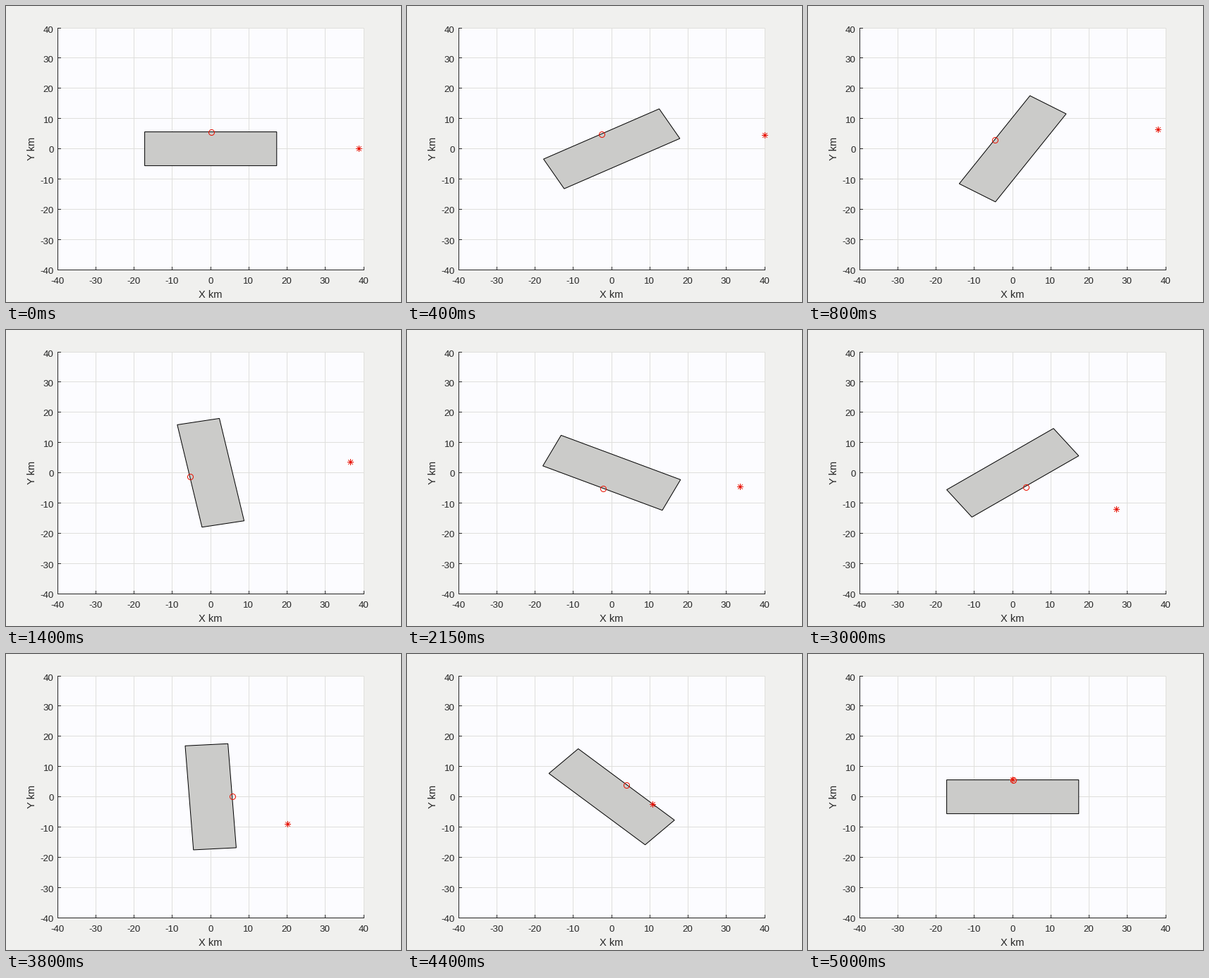
A matplotlib script that plays this animation: 560 px wide and 420 px high, repeating every 5050 ms.

```python
import numpy as np
import matplotlib.pyplot as plt
from matplotlib.animation import FuncAnimation
from matplotlib.patches import Polygon, Rectangle

W, H, DPI = 560, 420, 100
PX = 72 / DPI  # points per pixel
STEPS = 100
INK = "#262626"
RED = "#e81000"
GRID = "#dfdfdc"
HALF_W, HALF_H = 17.25, 5.6

plt.rcParams.update({"font.family": "Liberation Sans", "path.snap": False,
                     "axes.unicode_minus": False})

fig = plt.figure(figsize=(W / DPI, H / DPI), dpi=DPI, facecolor="#f0f0ee")
ax = fig.add_axes([0, 0, 1, 1])
ax.set_xlim(0, W)
ax.set_ylim(H, 0)
ax.axis("off")


def sx(x):
    return 290.2 + 5.425 * x


def sy(y):
    return 202.6 - 4.2875 * y


def snap(v):
    """Centre of the pixel that holds v."""
    return np.floor(v) + 0.5


def line(x0, y0, x1, y1, color, z):
    ax.plot([x0, x1], [y0, y1], color=color, lw=PX, zorder=z,
            solid_capstyle="butt")


def text(x, y, s, size=13.33, **kw):
    ax.text(x, y, s, fontsize=size * PX, color=INK, va="baseline", **kw)


# Plot area, grid, ticks and labels
left, right = snap(sx(-40)), snap(sx(40))
top, bottom = snap(sy(40)), snap(sy(-40))
ax.add_patch(Rectangle((left, top), right - left, bottom - top,
                       fc="#fcfcff", lw=0, zorder=0))
for v in range(-40, 41, 10):
    gx, gy = snap(sx(v)), snap(sy(v))
    line(gx, top, gx, bottom, GRID, 1)
    line(left, gy, right, gy, GRID, 1)
    line(gx, bottom, gx, bottom - 4.5, INK, 2)
    line(left, gy, left + 4.5, gy, INK, 2)
    text(gx - 0.7, 393.5, str(v), ha="center")
    text(67.5, gy + 6, str(v), ha="right")
line(left, top - 0.5, left, bottom + 0.5, INK, 2)
line(left - 0.5, bottom, right + 0.5, bottom, INK, 2)
text(289.7, 414, "X km", 14.67, ha="center")
text(41, 202.5, "Y km", 14.67, ha="center", rotation=90,
     rotation_mode="anchor")

# Approach path: step, x km, y km
PATH = np.array([(0, 38.75, 0), (11, 39.9, 5.6), (16, 38, 6.4),
                 (28, 36.5, 3.6), (43, 33.6, -4.65), (60, 27.1, -12),
                 (76, 20.1, -9.1), (100, 0, HALF_H)])
T, P = PATH[:, 0], PATH[:, 1:]
SLOPE = np.gradient(P, T, axis=0)


def probe_at(k):
    """Cubic Hermite curve through the path points."""
    i = min(np.searchsorted(T, k, side="right") - 1, len(T) - 2)
    h = T[i + 1] - T[i]
    u = (k - T[i]) / h
    ease = u * u * (3 - 2 * u)
    bend = h * u * (1 - u) * (SLOPE[i] * (1 - u) - SLOPE[i + 1] * u)
    return P[i] * (1 - ease) + P[i + 1] * ease + bend


body = Polygon([(0, 0)] * 4, closed=True, fc="#cbcbc9", ec="black", lw=PX,
               joinstyle="miter", zorder=3)
ax.add_patch(body)
site, = ax.plot([], [], "o", ms=8 * PX, mfc="none", mec=RED, mew=PX, zorder=4)
probe, = ax.plot([], [], color=RED, lw=PX, zorder=5, solid_capstyle="butt")

corners = np.array([(-1, -1), (1, -1), (1, 1), (-1, 1)]) * (HALF_W, HALF_H)
# Eight-armed star as four strokes split by gaps
star = []
for n in range(4):
    arm = 4.5 * np.array([np.cos(n * np.pi / 4), np.sin(n * np.pi / 4)])
    star += [-arm, arm, (np.nan, np.nan)]
star = np.array(star)


def draw(k):
    a = 2 * np.pi * k / STEPS
    c, s = np.cos(a), np.sin(a)
    x, y = corners.T
    body.set_xy(np.column_stack([sx(x * c - y * s), sy(x * s + y * c)]))
    site.set_data([snap(sx(-HALF_H * s))], [snap(sy(HALF_H * c))])
    px, py = probe_at(k)
    probe.set_data(snap(sx(px)) + star[:, 0], snap(sy(py)) + star[:, 1])
    return body, site, probe


anim = FuncAnimation(fig, draw, frames=STEPS + 1, interval=50, repeat=True,
                     repeat_delay=0, init_func=lambda: draw(0))
plt.show()
```
